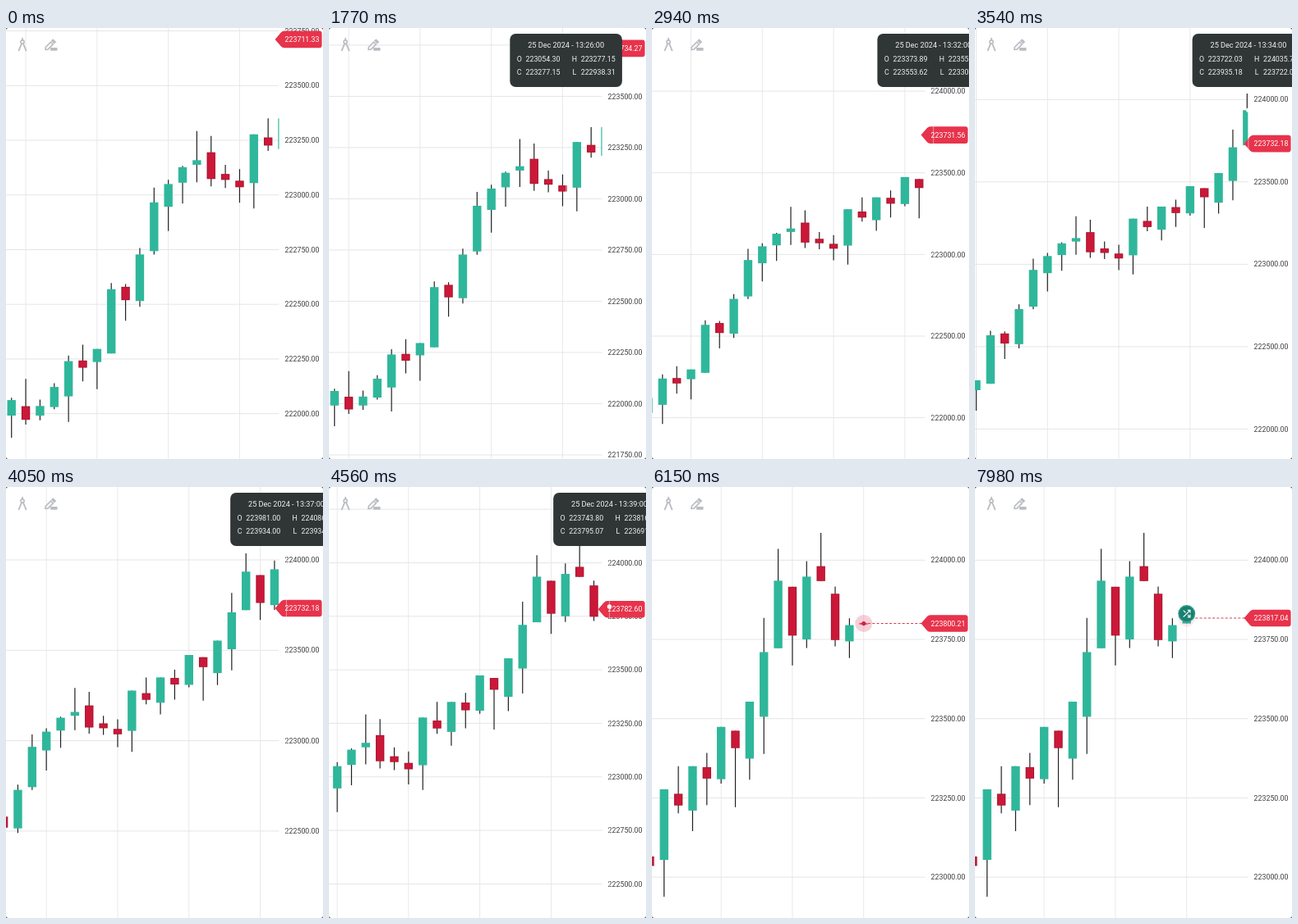
Animation of 386 by 526 pixels, one loop 8 s. Source, as an HTML page with a canvas:

```html
<!DOCTYPE html>
<html lang="en">
<head>
<meta charset="utf-8">
<title>Candlestick chart</title>
<style>
html, body { margin: 0; width: 100%; height: 100%; overflow: hidden; background: #fff; }
canvas { display: block; width: 386px; height: 526px; }
</style>
</head>
<body>
<canvas id="chart"></canvas>
<script>
const W = 386, H = 526, LOOP = 8000;
const PLOT_W = 332.5, FIRST_X = 6.7, GAP = 17.36, BODY_W = 10.4;
const BASE = 222000;
const TEAL = '#2fb79b', RED = '#cc1838', DARK_RED = '#a91431', TAG = '#e7334b';
const FONT = 'Roboto, Arial, sans-serif';

// open, close, high, low, relative to BASE
const candles = [
  [-9, 62, 73, -110], [34, -28, 159, -50], [-9, 35, 64, -30], [30, 122, 139, 20],
  [79, 240, 266, -38], [243, 210, 315, 148], [236, 296, 296, 112], [275, 569, 597, 275],
  [580, 519, 593, 425], [515, 728, 757, 489], [743, 966, 1034, 727], [946, 1050, 1069, 835],
  [1056, 1127, 1133, 961], [1138, 1159, 1292, 1058], [1195, 1073, 1270, 1039], [1096, 1069, 1138, 1032],
  [1065.2, 1035.4, 1118.36, 964.12], [1054.3, 1277.15, 1277.15, 938.31], [1263, 1226, 1350, 1201], [1210, 1350, 1350, 1145],
  [1347, 1311, 1392, 1227], [1309, 1474, 1474, 1295], [1462, 1407, 1462, 1221], [1373.89, 1553.62, 1553.62, 1307.2],
  [1506, 1710, 1818, 1389], [1722.03, 1935.18, 2035.74, 1722.03], [1916, 1762, 1916, 1668], [1750, 1948, 1997, 1723],
  [1981, 1934, 2086, 1934], [1894, 1748, 1917, 1728], [1743.8, 1795.07, 1816.4, 1691.25]
];
const LAST = candles.length;
const LAST_OPEN = 1800.21;

// time, price
const ticks = [[-900, 1711.33], [210, 1716.9], [1230, 1734.27], [2250, 1731.56],
  [3240, 1732.18], [4230, 1782.6], [5250, 1800.21], [6240, 1808.47], [7260, 1817.04]];

const canvas = document.getElementById('chart');
const ctx = canvas.getContext('2d');
const dpr = window.devicePixelRatio || 1;
canvas.width = W * dpr;
canvas.height = H * dpr;

const clamp = v => Math.max(0, Math.min(1, v));
const mix = (a, b, k) => a + (b - a) * k;
const progress = (t, start, end) => clamp((t - start) / (end - start));
const easeOut = k => 1 - (1 - k) ** 3;
const easeInOut = k => k < .5 ? 2 * k * k : 1 - 2 * (1 - k) ** 2;
const money = v => (BASE + v).toFixed(2);

// Horizontal scroll: short run-up, constant speed, soft stop
function scroll(t) {
  const v = .0767, end = 287.1, brake = 5625, stop = 6091;
  if (t <= 2070) return 0;
  if (t < 2160) return v * (t - 2070) ** 2 / 180;
  if (t < brake) return v * (t - 2115);
  if (t < stop) return end - v * (stop - t) ** 2 / (2 * (stop - brake));
  return end;
}
const candleX = (i, t) => FIRST_X + i * GAP - scroll(t);

function visibleRange(t) {
  let hi = -Infinity, lo = Infinity;
  candles.forEach((c, i) => {
    const x = candleX(i, t);
    if (x < -16 || x > 422.5) return;
    hi = Math.max(hi, c[2]);
    lo = Math.min(lo, c[3]);
  });
  return [hi, lo];
}

function trailing(t, span, side) {
  const n = 60;
  let sum = 0;
  for (let k = 0; k < n; k++) sum += visibleRange(t - span * (k + .5) / n)[side];
  return sum / n;
}

function priceScale(t) {
  const inset = 14 * (easeInOut(progress(t, 930, 1620)) - easeInOut(progress(t, 5400, 6090)));
  const top = 56 + inset, bottom = 500 - inset;
  const hi = trailing(t, 480, 0), lo = trailing(t, 610, 1);
  const k = (bottom - top) / (hi - lo);
  return { k, y: v => top + (hi - v) * k, value: y => hi - (y - top) / k };
}

function priceAt(t) {
  let n = ticks.length - 1;
  while (n > 0 && ticks[n][0] > t) n--;
  if (!n) return ticks[0][1];
  return mix(ticks[n - 1][1], ticks[n][1], easeOut(progress(t, ticks[n][0], ticks[n][0] + 270)));
}

function selected(t) {
  const edge = t < 1762 ? 300 : mix(311, 347.5, progress(t, 2070, 2260));
  return Math.min(LAST - 1, Math.floor((edge + scroll(t) - FIRST_X) / GAP));
}

function cursor(t) {
  const i = selected(t), glide = 115;
  let age = 0;
  while (age < glide && selected(t - age) === i) age++;
  const lag = t > 2160 ? 1.6 : 0;
  return { i, x: candleX(i, t) - GAP * (1 - easeOut(age / glide)) + lag };
}

function text(str, x, y, color, size = 8.8, align = 'left') {
  ctx.font = `${size}px ${FONT}`;
  ctx.textAlign = align;
  ctx.fillStyle = color;
  ctx.fillText(str, x, y + size * .356);
}

function stroke(points, color, width) {
  ctx.beginPath();
  points.forEach(([x, y], i) => i ? ctx.lineTo(x, y) : ctx.moveTo(x, y));
  ctx.strokeStyle = color;
  ctx.lineWidth = width;
  ctx.stroke();
}

function disc(x, y, r, color) {
  ctx.beginPath();
  ctx.arc(x, y, r, 0, 7);
  ctx.fillStyle = color;
  ctx.fill();
}

function panel(x, y, w, h, r, color) {
  ctx.beginPath();
  ctx.roundRect(x, y, w, h, r);
  ctx.fillStyle = color;
  ctx.fill();
}

function drawGrid(t, scale) {
  const step = 250 * scale.k > 57 ? 250 : 500;
  for (let i = 1; i < 50; i += 5) {
    const x = candleX(i, t);
    if (x < PLOT_W) stroke([[x, 0], [x, H]], '#e9e9ea', 1);
  }
  const first = Math.floor(scale.value(H + 10) / step) * step;
  for (let v = first; v < scale.value(-10); v += step) {
    const y = scale.y(v);
    stroke([[0, y], [PLOT_W, y]], '#e4e5e6', 1);
    text(money(v), 339.6, y, '#3b3d40');
  }
}

function drawCandle(x, [open, close, high, low], scale) {
  const top = scale.y(Math.max(open, close));
  const h = Math.max(1, scale.y(Math.min(open, close)) - top);
  const left = x - BODY_W / 2;
  const up = close > open;
  stroke([[x, scale.y(high)], [x, scale.y(low)]], '#222', 1.2);
  ctx.fillStyle = up ? TEAL : DARK_RED;
  ctx.fillRect(left, top, BODY_W, h);
  if (!up && h > 3) {
    ctx.fillStyle = RED;
    ctx.fillRect(left + 1.2, top + .8, BODY_W - 2.2, h - 1.6);
  }
}

function drawCandles(t, scale, price) {
  ctx.save();
  ctx.beginPath();
  ctx.rect(0, 0, PLOT_W, H);
  ctx.clip();
  candles.forEach((c, i) => drawCandle(candleX(i, t), c, scale));
  if (t > 5250) {
    const hi = Math.max(price, LAST_OPEN), lo = Math.min(price, LAST_OPEN);
    drawCandle(candleX(LAST, t), [LAST_OPEN, price, hi, lo], scale);
  }
  ctx.restore();
}

function drawPrice(t, scale, price) {
  const x = candleX(LAST, t), y = scale.y(price);
  if (x < 328) {
    const pulse = mix(.22, .05, progress(t, 6250, 6870)) + .07 * Math.sin(Math.PI * progress(t, 7710, 8060));
    disc(x, y, 10.5, `rgba(214,40,80,${pulse})`);
    ctx.setLineDash([3, 2.2]);
    stroke([[x - 5, y], [329, y]], '#dc3c52', 1.1);
    ctx.setLineDash([]);
    disc(x, y, 2.6, '#d5203f');
  }
  ctx.beginPath();
  ctx.moveTo(327.6, y);
  ctx.lineTo(335, y - 8.6);
  ctx.quadraticCurveTo(336.6, y - 10.3, 339, y - 10.3);
  ctx.arcTo(384.6, y - 10.3, 384.6, y, 3);
  ctx.arcTo(384.6, y + 10.3, 339, y + 10.3, 3);
  ctx.lineTo(339, y + 10.3);
  ctx.quadraticCurveTo(336.6, y + 10.3, 335, y + 8.6);
  ctx.closePath();
  ctx.fillStyle = TAG;
  ctx.fill();
  text(money(price), 339.6, y, '#fff');
}

function drawMarker(t, scale) {
  const k = progress(t, 6540, 6870);
  if (!k) return;
  const size = 1 + 2.2 * (k - 1) ** 3 + 1.2 * (k - 1) ** 2;
  ctx.save();
  ctx.translate(candleX(LAST, t), 154.6);
  ctx.scale(size, size);
  disc(0, 0, 10.5, '#2b9c88');
  disc(0, 0, 9, '#187f6e');
  const white = '#fff';
  stroke([[-4, 4], [4, -4]], white, 1.2);
  stroke([[-4, -4], [-1.2, -1.2]], white, 1.2);
  stroke([[1.2, 1.2], [4, 4]], white, 1.2);
  stroke([[1, -4.2], [4.2, -4.2], [4.2, -1]], white, 1.2);
  stroke([[1, 4.2], [4.2, 4.2], [4.2, 1]], white, 1.2);
  ctx.restore();
}

function drawTools() {
  const grey = '#babdc2';
  ctx.lineCap = 'round';
  // compass
  stroke([[20, 12.6], [20, 15]], grey, 1.8);
  ctx.beginPath();
  ctx.arc(20, 17, 2.1, 0, 7);
  ctx.lineWidth = 1.6;
  ctx.stroke();
  stroke([[18.9, 19.4], [15.6, 27.3]], grey, 1.8);
  stroke([[21.1, 19.4], [24.4, 27.3]], grey, 1.8);
  ctx.lineCap = 'butt';
  // pencil
  ctx.save();
  ctx.translate(47.4, 27);
  ctx.rotate(-Math.PI / 4);
  ctx.strokeStyle = grey;
  ctx.lineWidth = 1.6;
  ctx.beginPath();
  ctx.moveTo(.8, 0);
  ctx.lineTo(3.2, -2);
  ctx.lineTo(12, -2);
  ctx.lineTo(12, 2);
  ctx.lineTo(3.2, 2);
  ctx.closePath();
  ctx.stroke();
  ctx.fillStyle = grey;
  ctx.fillRect(13.3, -2.8, 3.5, 5.6);
  ctx.restore();
  panel(54, 24, 8.6, 3.8, 1, grey);
}

function drawTooltip(t, scale) {
  if (t < 930 || t > 5400) return;
  const { i, x } = cursor(t);
  const [open, close, high, low] = candles[i];
  ctx.globalAlpha = progress(t, 900, 1050) * (1 - progress(t, 5280, 5400));
  stroke([[x, 0], [x, H]], 'rgba(255,255,255,.45)', 1);
  disc(x, scale.y(close), 2.7, '#fff');

  const left = x - 68.3;
  const pad = n => String(n).padStart(2, '0');
  const minute = 9 + i;
  panel(left, 7, 136.6, 65, 7, '#303636');
  text(`25 Dec 2024 - 13:${pad(minute)}:00`, x, 21.2, '#f2f3f3', 9.1, 'center');
  const cell = (label, value, dx, y) => {
    text(label, left + dx + 3.2, y, '#f2f3f3', 8.8, 'center');
    text(money(value), left + dx + 11, y, '#f2f3f3');
  };
  cell('O', open, 8.2, 37.6);
  cell('H', high, 75.4, 37.6);
  cell('C', close, 8.2, 53.4);
  cell('L', low, 75.4, 53.4);
  ctx.globalAlpha = 1;
}

function draw(t) {
  const scale = priceScale(t), price = priceAt(t);
  ctx.setTransform(dpr, 0, 0, dpr, 0, 0);
  ctx.fillStyle = '#4a4a4a';
  ctx.fillRect(0, 0, W, H);
  panel(0, 0, W, H, 3, '#fff');
  drawGrid(t, scale);
  drawCandles(t, scale, price);
  drawTools();
  drawPrice(t, scale, price);
  drawMarker(t, scale);
  drawTooltip(t, scale);
}

const start = performance.now();
function loop() {
  draw((performance.now() - start) % LOOP);
  requestAnimationFrame(loop);
}
loop();
</script>
</body>
</html>
```
